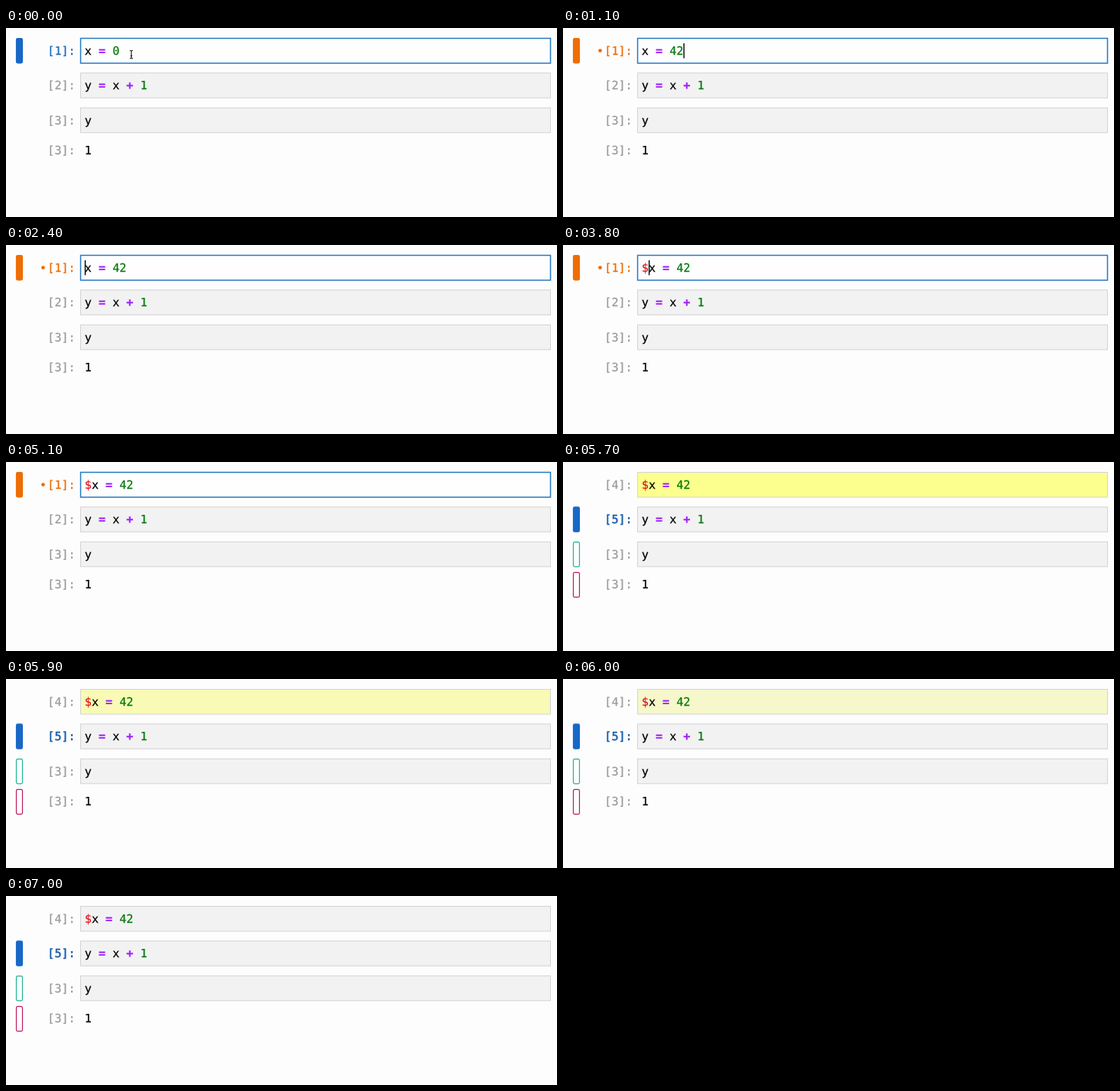
Recreate the animation shown at these times as an HTML page. Size 720 by 247 pixels, loop 8 s.

```html
<!DOCTYPE html>
<html lang="en">
<head>
<meta charset="utf-8">
<title>Reactive notebook cells</title>
<style>
  html, body { margin: 0; width: 100%; height: 100%; overflow: hidden; background: #fdfdfe; }
  svg { display: block; width: 100vw; height: 100vh; }
  text {
    font: 15.1px "DejaVu Sans Mono", monospace;
    text-rendering: geometricPrecision;
    white-space: pre;
    color: #000;
    fill: currentColor;
    stroke: currentColor;
    stroke-width: .25;
  }
  tspan { fill: currentColor; stroke: currentColor; }
  .op { font-weight: bold; color: #a01ffa; }
  .num { color: #077a0c; }
  .err { color: #e01018; }
</style>
</head>
<body>
<svg id="stage" viewBox="0 0 720 247"></svg>
<script>
const LOOP = 8000, STEP = 100;
const CODE_X = 102.8, CHAR = 9.09;
const BLUE = '#1868c7', ORANGE = '#ee6d05', GREY = '#9b9b9b';
const GREEN = '#1fb491', PINK = '#bf1a5b', EDGE = '#d3d3d5', FILL = '#f2f2f3';
const RUN = 5600;

const stage = document.getElementById('stage');

function add(tag, attrs, parent = stage) {
  const el = document.createElementNS('http://www.w3.org/2000/svg', tag);
  set(el, attrs);
  return parent.appendChild(el);
}

function set(el, attrs) {
  for (const key in attrs) el.setAttribute(key, attrs[key]);
}

function show(el, on) {
  el.setAttribute('visibility', on ? 'visible' : 'hidden');
}

function label(x, y, content = '') {
  const el = add('text', { x, y });
  el.textContent = content;
  return el;
}

function setCode(el, code) {
  if (el.dataset.code === code) return;
  el.dataset.code = code;
  el.textContent = '';
  for (const part of code.match(/\d+|[=+]|\$|[a-z]+|\s+/g) || []) {
    const kind = /\d/.test(part) ? 'num' : /[=+]/.test(part) ? 'op' : part === '$' ? 'err' : '';
    add('tspan', { class: kind }, el).textContent = part;
  }
}

function makeCell(top, code) {
  const cell = {
    box: add('rect', { x: 97.5, y: top + .5, width: 614, height: 32.5, fill: FILL, stroke: EDGE }),
    prompt: label(54.3, top + 22),
    code: label(CODE_X, top + 22)
  };
  setCode(cell.code, code);
  return cell;
}

function makeBar(top, color, solid) {
  return add('rect', {
    x: 13.5, y: top + .6, width: 8, height: 32.3, rx: 1.8,
    fill: solid ? color : 'none', stroke: color, 'stroke-width': 1.2
  });
}

const cells = [makeCell(13, 'x = 0'), makeCell(58.3, 'y = x + 1'), makeCell(103.8, 'y')];
set(label(54.3, 165.3, '[3]:'), { style: `color:${GREY}` });
label(CODE_X, 165.3, '1');

const editBar = makeBar(13, BLUE, true);
const runBars = [makeBar(58.3, BLUE, true), makeBar(104, GREEN), makeBar(143.8, PINK)];
const dot = add('circle', { cx: 48.5, cy: 29.6, r: 2.4, fill: ORANGE });
const caret = add('rect', { y: 20, width: 1.4, height: 19.5, fill: '#000' });
const pointer = add('path', {
  d: 'M161.7 29.2Q163.8 29.2 163.8 30.7V38.6Q163.8 40 161.7 40M165.9 29.2Q163.8 29.2 163.8 30.7M163.8 38.6Q163.8 40 165.9 40M162.6 36.4H165',
  fill: 'none', stroke: '#222', 'stroke-width': 1.15
});

// [time, code, caret column or -1 when blinked off]
const edits = [
  [0, 'x = 0', -1], [100, 'x = 0', 5], [400, 'x = ', 4],
  [900, 'x = 4', 5], [1100, 'x = 42', 6], [1600, 'x = 42', -1],
  [1900, 'x = 42', 0], [2500, 'x = 42', -1], [3100, 'x = 42', 0],
  [3400, '$x = 42', 1], [4000, '$x = 42', -1], [4600, '$x = 42', 1],
  [5000, '$x = 42', -1]
];

function flashColor(t) {
  const k = Math.min(1, (t - RUN) / 600);
  const mix = (a, b) => Math.min(255, Math.round(a + (b - a) * k));
  return `rgb(${mix(254, 242)},${mix(258, 242)},${mix(120, 243)})`;
}

function setPrompt(cell, content, color, strong) {
  cell.prompt.textContent = content;
  set(cell.prompt, { style: `color:${color};stroke-width:${strong ? .45 : .25}` });
}

function draw(t) {
  t = Math.floor(t / STEP) * STEP;
  const ran = t >= RUN, dirty = t >= 400 && !ran;
  const [, code, column] = edits.filter(e => e[0] <= t).pop();
  const [first, second, third] = cells;

  setCode(first.code, code);
  setPrompt(first, ran ? '[4]:' : '[1]:', ran ? GREY : dirty ? ORANGE : '#1a6cbb');
  setPrompt(second, ran ? '[5]:' : '[2]:', ran ? '#1a5fa8' : GREY, ran);
  setPrompt(third, '[3]:', GREY);
  set(first.box, {
    fill: ran ? flashColor(t) : '#fefeff',
    stroke: ran ? EDGE : '#2479c2',
    'stroke-width': ran ? 1 : 1.5
  });

  set(editBar, { fill: dirty ? ORANGE : BLUE, stroke: dirty ? ORANGE : BLUE });
  show(editBar, !ran);
  runBars.forEach(bar => show(bar, ran));
  show(dot, dirty);
  show(pointer, t < 400);
  show(caret, column >= 0 && !ran);
  set(caret, { x: CODE_X + Math.max(0, column) * CHAR });
}

const start = performance.now();
function tick() {
  draw((performance.now() - start) % LOOP);
  requestAnimationFrame(tick);
}
tick();
</script>
</body>
</html>
```
